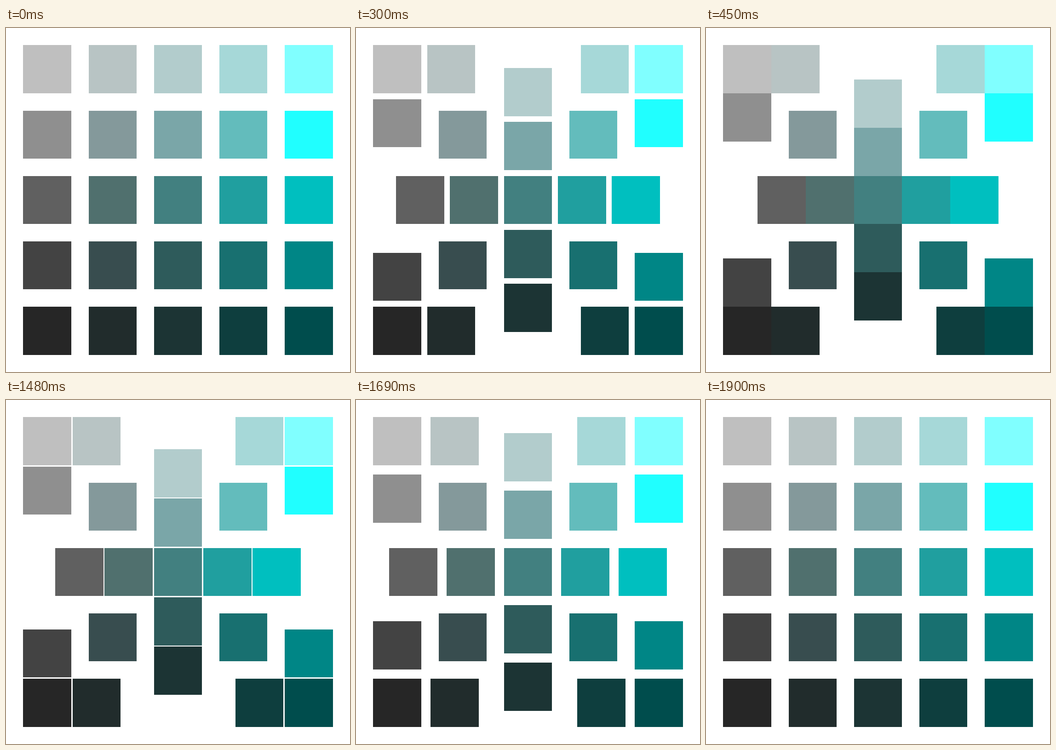
An HTML page with a canvas that plays this animation: 748 px wide and 748 px high, repeating every 2900 ms.

```html
<!DOCTYPE html>
<html lang="en">
<head>
<meta charset="utf-8">
<title>Sliding swatches</title>
<style>
  html, body { margin: 0; width: 100%; height: 100%; overflow: hidden; background: #fff; }
  canvas { display: block; width: 748px; height: 748px; }
</style>
</head>
<body>
<canvas id="stage" width="748" height="748"></canvas>
<script>
const ctx = document.getElementById('stage').getContext('2d');
const LOOP = 2900, STEP = 30, STEPS = 15, RETURN = 1450;
const GAP = 37.4, SIZE = 104.72;

const colors = [
  ['#bfbfbf', '#b8c4c4', '#b2cccc', '#a6d8d8', '#80ffff'],
  ['#8f8f8f', '#84999b', '#7aa6a8', '#63bcbc', '#20ffff'],
  ['#606060', '#50706e', '#428080', '#209f9f', '#00bfbf'],
  ['#434343', '#384d4f', '#2e5b5b', '#187070', '#008686'],
  ['#262626', '#212c2c', '#1c3434', '#0e3e3e', '#004d4d']
];

// Gaps travelled along one axis: the middle line closes inward, the outer lines part.
function shift(i, line) {
  if (line === 2) return 2 - i;
  return line % 4 === 0 && i % 2 ? i - 2 : 0;
}

// 0 = even grid, 1 = closed; linear, in whole steps.
function closed(t) {
  const part = ms => Math.min(Math.floor(ms / STEP) / STEPS, 1);
  return t < RETURN ? part(t) : 1 - part(t - RETURN);
}

function draw(t) {
  const p = closed(t);
  const place = (i, line) => GAP + i * (SIZE + GAP) + shift(i, line) * GAP * p;
  ctx.fillStyle = '#fff';
  ctx.fillRect(0, 0, 748, 748);
  colors.forEach((row, r) => row.forEach((color, c) => {
    const x = place(c, r), y = place(r, c);
    const left = Math.round(x), top = Math.round(y);
    ctx.fillStyle = color;
    ctx.fillRect(left, top, Math.round(x + SIZE) - left, Math.round(y + SIZE) - top);
  }));
}

const start = performance.now();
function tick() {
  draw((performance.now() - start) % LOOP);
  requestAnimationFrame(tick);
}
tick();
</script>
</body>
</html>
```
